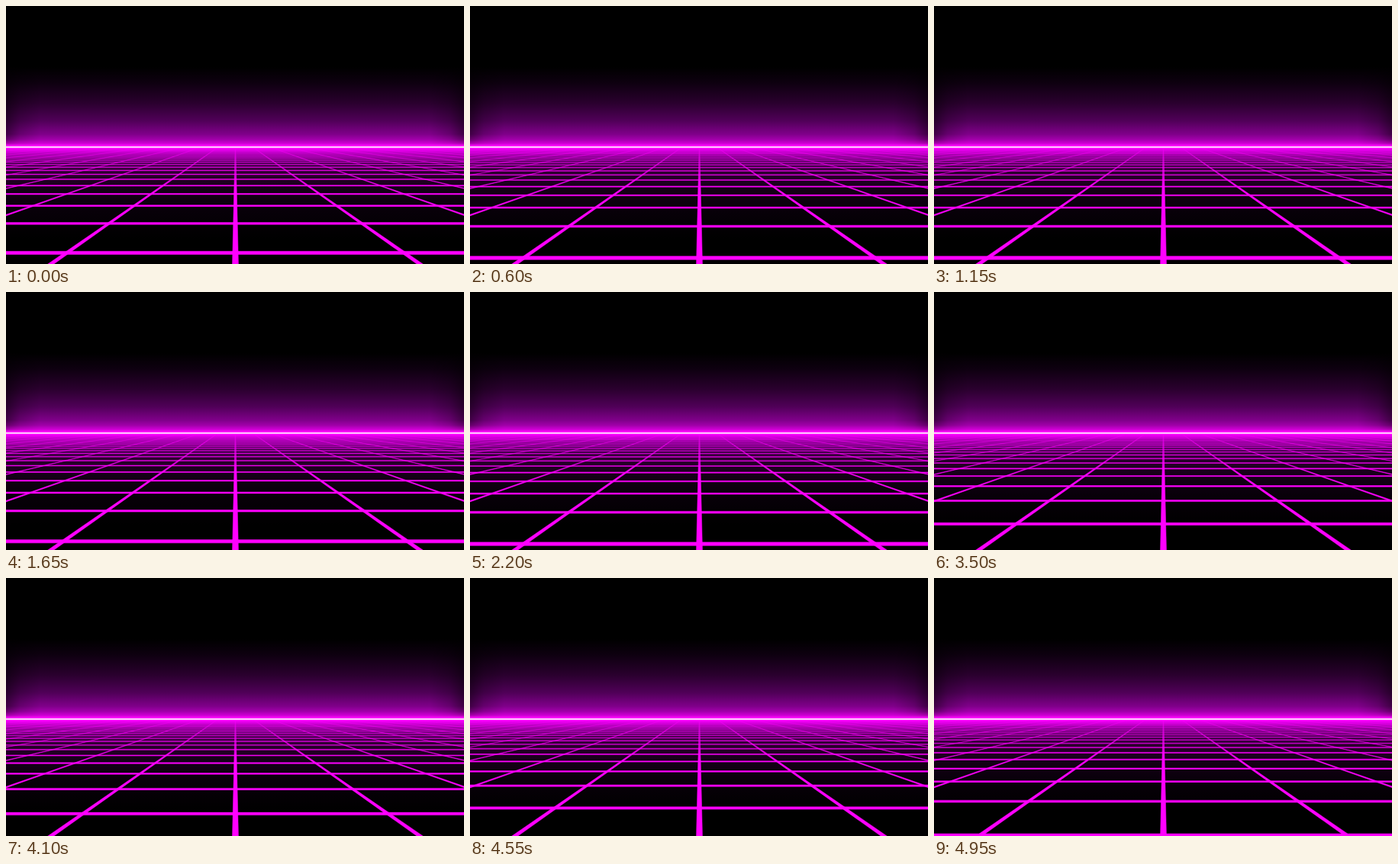
These frames come from a looping animation (600 px wide and 338 px high, 5 s). An HTML page:

```html
<!DOCTYPE html>
<html lang="en">
<head>
<meta charset="utf-8">
<title>Neon grid</title>
<style>
  html, body { margin: 0; width: 100%; height: 100%; overflow: hidden; background: #000; }
  svg { display: block; width: 600px; height: 338px; }
</style>
</head>
<body>
<svg viewBox="0 0 600 338" width="600" height="338">
  <defs>
    <linearGradient id="sky" x1="0" y1="80" x2="0" y2="185" gradientUnits="userSpaceOnUse">
      <stop offset="0" stop-color="#000"/>
      <stop offset=".2" stop-color="#0e0010"/>
      <stop offset=".45" stop-color="#2a002e"/>
      <stop offset=".67" stop-color="#500058"/>
      <stop offset=".81" stop-color="#780082"/>
      <stop offset="1" stop-color="#a800b4"/>
    </linearGradient>
    <linearGradient id="halo" x1="0" y1="168" x2="0" y2="185" gradientUnits="userSpaceOnUse">
      <stop offset="0" stop-color="#f0f" stop-opacity="0"/>
      <stop offset=".4" stop-color="#f0f" stop-opacity=".16"/>
      <stop offset=".7" stop-color="#f0f" stop-opacity=".5"/>
      <stop offset=".9" stop-color="#f0f"/>
    </linearGradient>
    <linearGradient id="floor" x1="0" y1="185" x2="0" y2="305" gradientUnits="userSpaceOnUse">
      <stop offset="0" stop-color="#f0f"/>
      <stop offset=".025" stop-color="#d800e6"/>
      <stop offset=".05" stop-color="#a000ae"/>
      <stop offset=".09" stop-color="#680074"/>
      <stop offset=".17" stop-color="#420049"/>
      <stop offset=".3" stop-color="#270029"/>
      <stop offset=".46" stop-color="#140016"/>
      <stop offset=".68" stop-color="#080009"/>
      <stop offset="1" stop-color="#000"/>
    </linearGradient>
    <linearGradient id="ink" x1="0" y1="186" x2="0" y2="240" gradientUnits="userSpaceOnUse">
      <stop offset="0" stop-color="#f0f" stop-opacity=".25"/>
      <stop offset=".25" stop-color="#f0f" stop-opacity=".55"/>
      <stop offset="1" stop-color="#f0f"/>
    </linearGradient>
    <linearGradient id="sides">
      <stop offset="0" stop-opacity=".5"/>
      <stop offset=".03" stop-opacity=".2"/>
      <stop offset=".075" stop-opacity="0"/>
      <stop offset=".925" stop-opacity="0"/>
      <stop offset=".97" stop-opacity=".2"/>
      <stop offset="1" stop-opacity=".5"/>
    </linearGradient>
    <filter id="soft" x="0" y="160" width="600" height="190" filterUnits="userSpaceOnUse" color-interpolation-filters="sRGB">
      <feGaussianBlur stdDeviation=".6"/>
    </filter>
    <clipPath id="ground"><rect y="186" width="600" height="152"/></clipPath>
  </defs>
  <rect width="600" height="338"/>
  <rect y="80" width="600" height="105" fill="url(#sky)"/>
  <rect y="80" width="600" height="105" fill="url(#sides)"/>
  <rect y="168" width="600" height="17" fill="url(#halo)"/>
  <rect y="185" width="600" height="120" fill="url(#floor)"/>
  <g clip-path="url(#ground)">
    <g filter="url(#soft)" fill="url(#ink)" stroke="url(#ink)" stroke-width=".5">
      <path id="rays"/>
      <path id="rows"/>
    </g>
  </g>
  <rect y="183" width="600" height="4" fill="#f0f"/>
  <rect y="184" width="600" height="1.6" fill="#fff"/>
</svg>
<script>
  const VX = 300.5, VY = 169;      // vanishing point
  const GAP = 1.43, RAY = 0.047;   // ray spacing and width per pixel of depth
  const K = 465, ROW = 0.07;       // row perspective and thickness
  const NEAR = 3.012;              // depth of the nearest row at the start
  const FRAME = 50, COUNT = 100;
  const CYCLE = 16;                // ticks a row needs to reach the next one
  const TOP = 180, BOTTOM = 345;

  function ray(i) {
    const at = (y, side) => (VX + (y - VY) * (i * GAP + side * RAY / 2)).toFixed(2) + ' ' + y;
    return `M${at(TOP, -1)}L${at(TOP, 1)}L${at(BOTTOM, 1)}L${at(BOTTOM, -1)}Z`;
  }

  function row(depth) {
    const y = VY + K / depth;
    const h = 0.55 + ROW * K / (depth * depth);
    return `M-5 ${(y - h / 2).toFixed(2)}h610v${h.toFixed(2)}h-610Z`;
  }

  let d = '';
  for (let i = -14; i <= 14; i++) d += ray(i);
  document.getElementById('rays').setAttribute('d', d);

  const rows = document.getElementById('rows');

  function draw(ms) {
    const frame = Math.floor(ms / FRAME) % COUNT;
    const tick = Math.floor(frame * 1.5);
    const shift = (tick % CYCLE) / CYCLE;
    let path = '';
    for (let n = 0; n < 26; n++) path += row(NEAR + n - shift);
    rows.setAttribute('d', path);
  }

  const start = performance.now();
  function loop() {
    draw(performance.now() - start);
    requestAnimationFrame(loop);
  }
  draw(0);
  requestAnimationFrame(loop);
</script>
</body>
</html>
```
